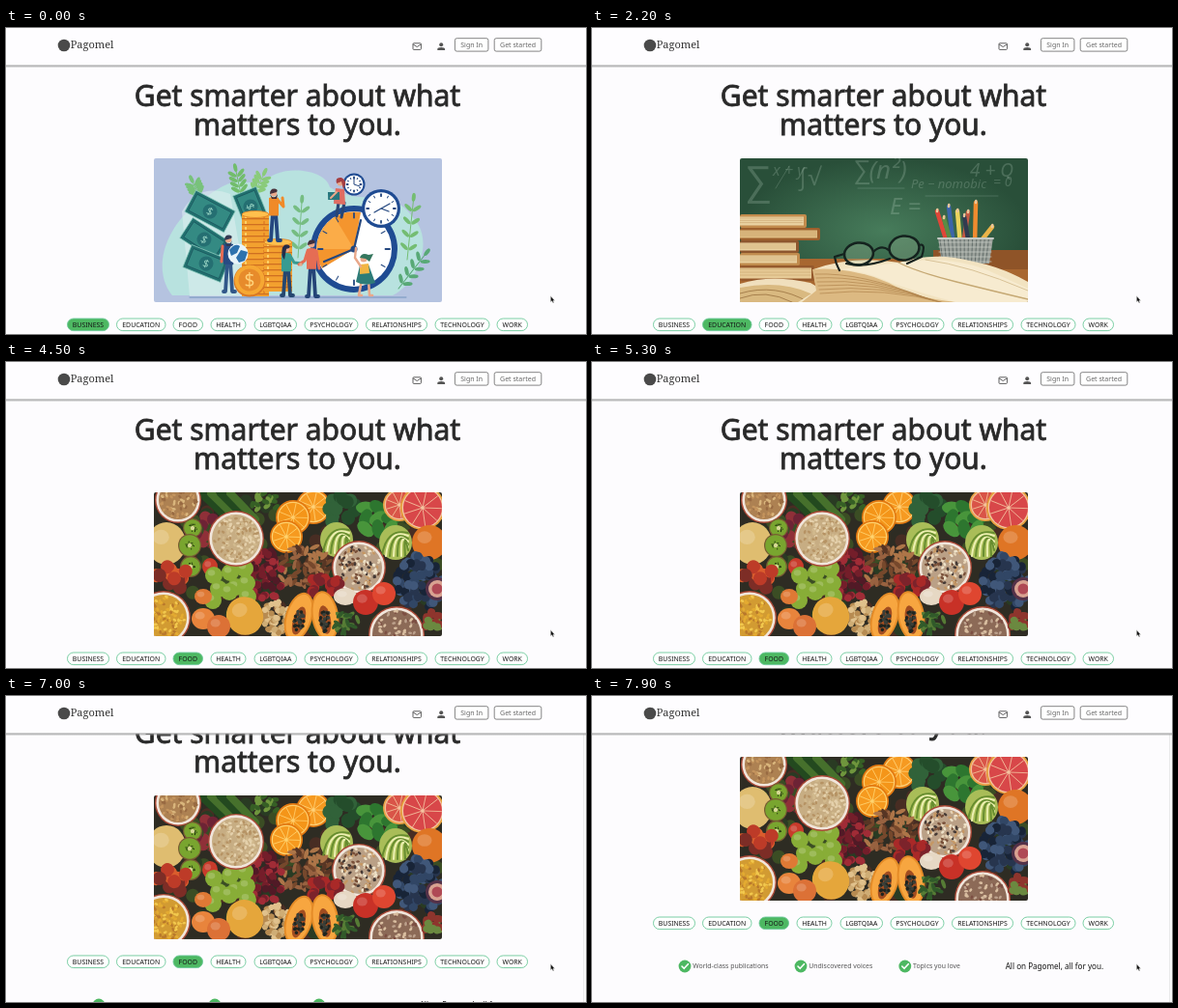
An HTML page for the animation above (8000 ms loop, 600 by 317 pixels).

```html
<!DOCTYPE html>
<html lang="en">
<head>
<meta charset="utf-8">
<title>Pagomel</title>
<style>
html, body { margin: 0; width: 100%; height: 100%; overflow: hidden; background: #fdfcfe; }
svg { display: block; width: 100vw; height: 100vh; }
text { font-family: "Noto Sans", "Open Sans", sans-serif; }
.serif { font-family: "Noto Serif", serif; }
</style>
</head>
<body>
<svg id="stage" viewBox="0 0 600 317" xmlns="http://www.w3.org/2000/svg"></svg>
<script>
const LOOP = 8000;
const SCROLL = [[6450, 0], [6600, 5], [6800, 18], [7000, 32], [7200, 45], [7400, 57], [7600, 67], [7800, 72]];
const TABS = [[0, 0], [300, 1], [4300, 2]];
const GREEN = '#4db862', NAVY = '#24477f', SKIN = '#e9a88a';

// Shape helpers
const rect = (x, y, w, h, fill, more = '') => `<rect x="${x}" y="${y}" width="${w}" height="${h}" fill="${fill}" ${more}/>`;
const circle = (x, y, r, fill, more = '') => `<circle cx="${x}" cy="${y}" r="${r}" fill="${fill}" ${more}/>`;
const oval = (x, y, rx, ry, fill, turn = 0, more = '') =>
  `<ellipse cx="${x}" cy="${y}" rx="${rx}" ry="${ry}" fill="${fill}" transform="rotate(${turn} ${x} ${y})" ${more}/>`;
const path = (d, fill, more = '') => `<path d="${d}" fill="${fill}" ${more}/>`;
const line = (d, color, w, more = '') => path(d, 'none', `stroke="${color}" stroke-width="${w}" stroke-linecap="round" stroke-linejoin="round" ${more}`);
const text = (x, y, size, fill, str, more = '') => `<text x="${x}" y="${y}" font-size="${size}" fill="${fill}" ${more}>${str}</text>`;
const group = (more, body) => `<g ${more}>${body}</g>`;
const repeat = (n, fn) => Array.from({ length: n }, (_, i) => fn(i)).join('');
const MIDDLE = 'text-anchor="middle"';

let seed = 7;
const random = () => (seed = seed * 16807 % 2147483647) / 2147483647;

// Small ovals scattered in an elliptical area
const scatter = (x, y, rx, ry, n, r, colors, flat = 1) => repeat(n, i => {
  const a = random() * 6.283, d = Math.sqrt(random());
  return oval((x + Math.cos(a) * d * rx).toFixed(1), (y + Math.sin(a) * d * ry).toFixed(1),
    r, r * flat, colors[i % colors.length], Math.round(random() * 180));
});

// ---- Business illustration
const sprig = (x, y, len, turn, color) => group(`transform="translate(${x} ${y}) rotate(${turn})"`,
  line(`M0 0V${-len}`, color, 1) + oval(0, -len - 3, 2, 4.5, color) +
  repeat(4, i => [-1, 1].map(s => oval(s * 4.5, -len * (i + 1) / 4.6, 2, 5, color, s * 50)).join('')));

const bill = (x, y, turn, w = 46, h = 25) => group(`transform="translate(${x} ${y}) rotate(${turn})"`,
  rect(-w / 2, -h / 2, w, h, '#22706f', 'stroke="#8fcfc0" stroke-width=".7"') +
  rect(-w / 2 + 3, -h / 2 + 3, w - 6, h - 6, '#348a83', 'stroke="#1b5960" stroke-width=".8"') +
  circle(0, 0, 7.5, '#256f72') + text(0, 4, 11, '#9ad6c5', '$', MIDDLE));

const stack = (x, y, w, h) => rect(x, y, w, h, '#f3a12f') + repeat(Math.floor(h / 6), i =>
  rect(x, y + 4 + i * 6, w, 1.3, '#cf6f21') + rect(x + 3, y + 1 + i * 6, 2, 3, '#ffd066') + rect(x + w - 6, y + 1 + i * 6, 2, 3, '#e38628')) +
  oval(x + w / 2, y, w / 2, 3.5, '#ffc04d', 0, 'stroke="#dc8128" stroke-width=".8"');

const clock = (x, y, r, ring, sector = '') => circle(x, y, r, '#1f4b92') + circle(x, y, r - ring, '#fff') + sector +
  repeat(12, i => line(`M${x} ${y - r + ring + 2}v${r * .1}`, NAVY, i % 3 ? 1 : 1.8, `transform="rotate(${i * 30} ${x} ${y})"`));

const person = (x, y, foot, hair, top, legs, arm) => {
  const hip = y + (foot - y) * .42;
  return line(`M${x - 1} ${hip}L${x - 3} ${foot}h-2M${x + 2} ${hip}L${x + 4} ${foot}h3`, legs, 3.8) +
    path(`M${x - 5} ${y + 5}Q${x} ${y + 3} ${x + 5} ${y + 5}L${x + 5} ${hip + 3}H${x - 5}Z`, top) +
    line(arm, top, 3) + circle(x, y, 3.4, SKIN) + path(`M${x - 4} ${y + 1}Q${x - 4} ${y - 5} ${x + 1} ${y - 4.5}Q${x + 5} ${y - 4} ${x + 3} ${y - 1}Z`, hair);
};

const business = () => rect(153, 135, 298, 149, '#b5c3e0') +
  path('M172 277C150 250 165 205 200 180S235 158 265 162C280 140 330 145 335 165C365 185 400 165 420 195C445 220 425 265 400 277Z', '#b8e2df') +
  path('M182 190Q200 160 232 172L250 278H190Z', '#dfeff0', 'opacity=".55"') +
  sprig(243, 172, 25, -12, '#72bd6c') + sprig(258, 170, 20, 25, '#8acb7a') + sprig(302, 238, 58, 4, '#76bd82') +
  sprig(415, 240, 62, 6, '#74bd72') + sprig(406, 270, 45, 38, '#58a976') + sprig(199, 172, 14, -25, '#78c27b') +
  bill(253, 185, 68, 34, 26) + bill(211, 190, 28) + bill(205, 219, 33, 44) + bill(207, 244, 22, 42) +
  line('M190 279H414', '#7393bd', 1) +
  stack(244, 193, 28, 85) + stack(267, 222, 29, 51) +
  circle(252, 262, 16.5, '#d97826') + circle(252, 261, 15.5, '#f6a833') + circle(252, 261, 11.5, '#e78b2b') + text(252, 268, 19, '#ffd27a', '$', MIDDLE) +
  clock(360, 229, 45, 6, path('M360 229L327 249A38.5 38.5 0 0 1 367 191Z', '#f4952e') + path('M360 229L322 229A38.5 38.5 0 0 1 340 196Z', '#fbac48')) +
  line('M329 242L360 229L367 199', NAVY, 2.2) + circle(360, 229, 3.5, NAVY) +
  clock(388, 187, 20, 3.2) + line('M381 191L388 187L396 190M388 187L397 182', NAVY, 1.3) +
  clock(360, 162, 11.5, 2) + line('M360 155V162L366 164', NAVY, 1) +
  person(277, 171, 220, '#473039', '#f08a28', NAVY, 'M281 178L287 185L286 176') + path('M273 172Q277 179 281 172L280 177H275Z', '#473039') +
  person(230, 219, 273, '#333953', '#274b83', '#315789', 'M227 227L224 240L234 244') +
  path('M226 220Q230 228 234 220L232 226H228Z', '#333953') + line('M224 226L223 242', '#e66b54', 3) +
  circle(240, 234, 10.5, '#e8f4fa') + path('M231 230Q237 222 242 226L239 233L233 236ZM243 230L250 232L247 241L241 243L238 238Z', '#2d72ae') +
  person(290, 229, 277, '#252d49', '#389b91', '#254770', 'M294 236L298 243L306 244') + path('M286 227Q284 236 288 240L290 229Z', '#252d49') +
  person(316, 224, 278, '#40303e', '#e56d54', '#244477', 'M312 231L309 241L303 245') + line('M321 231L324 249', '#e56d54', 3) + circle(305, 245, 1.8, SKIN) +
  line('M341 179L350 181L347 196M344 181L342 195', '#284675', 3.2) + path('M341 166L350 167L351 183L339 182Z', '#df6d62') +
  circle(346, 160, 3.6, SKIN) + path('M342 161Q340 154 347 155Q354 158 349 167L347 159Z', '#a53e42') +
  rect(327, 170, 12, 8, '#27767d', 'transform="skewX(2)"') + line('M342 170L336 176', SKIN, 2) +
  line('M368 261L365 277h3M375 261L376 277h3', SKIN, 2.6) + path('M366 246L375 245L382 264Q371 268 362 263Z', '#2e7c78') +
  path('M366 245L375 244L376 254L366 255Z', '#f2b544') + line('M367 247L361 238L362 228', SKIN, 2.4) +
  circle(370, 239, 3.5, SKIN) + path('M366 238Q368 232 375 235L380 234L376 242L372 239Z', '#34765d');

// ---- Education photograph, simplified
const book = (x, y, w, h, cover, page = '#ead2a1') => rect(x, y, w, h, cover, 'rx="2"') + rect(x, y + 2.5, w - 3, h - 5, page) +
  repeat(3, i => line(`M${x} ${y + 4 + i * (h - 7) / 3}h${w - 4}`, '#bd955e', .5));
const chalk = (x, y, size, str) => text(x, y, size, '#d8ebdd', str, 'opacity=".2" font-style="italic"');

const education = () => rect(153, 135, 298, 149, 'url(#board)') +
  chalk(157, 172, 40, '∑') + chalk(187, 153, 16, 'x + y') + chalk(213, 163, 25, '∫√') + chalk(270, 156, 26, '∑(n²)') +
  chalk(330, 166, 13, 'Pe − nomobic') + chalk(308, 193, 24, 'E =') + chalk(391, 154, 19, '4 + Q') + chalk(415, 164, 14, '= 0') +
  line('M204 143L190 166M275 166H323M345 174H420', '#d8ebdd', 1, 'opacity=".18"') +
  rect(153, 239, 298, 45, '#a86730') + rect(353, 230, 98, 20, '#8f5428') +
  book(153, 193, 69, 14, '#c28b4c') + book(153, 207, 83, 13, '#9e602d', '#dfbd83') + book(153, 220, 61, 13, '#8d562e') +
  book(153, 233, 62, 13, '#c08b4d') + book(153, 246, 77, 16, '#95592c', '#e7cb97') +
  [['#df4638', 357, 190, 368], ['#3c65aa', 369, 185, 374], ['#ead35d', 378, 190, 381], ['#c75943', 389, 191, 384], ['#f08b2f', 397, 181, 396], ['#eab348', 414, 206, 399], ['#5b8b45', 364, 197, 372], ['#303b50', 385, 195, 390]]
    .map(([c, x, y, foot]) => line(`M${x} ${y}L${foot} 225`, c, 4.5) + line(`M${x} ${y}l.3 -2`, '#eac69a', 2.5)).join('') +
  path('M358 217H415L411 244H362Z', '#9ba19b') + repeat(13, i => line(`M${360 + i * 4.2} 219L${363 + i * 3.7} 243`, '#5d6865', .9)) +
  repeat(5, i => line(`M359 ${222 + i * 5}H413`, '#cbd0c9', .7)) + line('M358 218H415', '#c4c9c3', 2) +
  path('M153 265Q185 255 226 264L260 284H153Z', '#f0dfbd') + path('M153 269Q195 261 226 275L239 284H153Z', '#d9b980') +
  line('M153 275Q190 264 224 284M153 280Q180 270 207 284', '#9a713f', .8) +
  path('M229 250Q270 235 318 243Q353 231 395 242Q425 248 451 263V284H213L232 272Z', '#f2e3c1') +
  path('M228 250Q269 247 307 264Q334 280 377 284H217L232 272Z', '#dcb982') +
  path('M318 243Q366 235 407 250Q432 261 451 270V284H376Q345 276 309 264Q287 253 257 250Z', '#f7ebd0') +
  repeat(6, i => line(`M${231 + i} ${255 + i * 4}Q${280 + i * 5} ${253 + i * 3} ${345 + i * 4} ${280 + i}`, '#ad8049', .65)) +
  line('M317 243Q337 253 377 263T451 281', '#c5a873', 1.3) + line('M345 240Q390 246 451 272', '#d8c297', 1) +
  oval(276, 234, 15, 11.5, '#a9c1a244', -7, 'stroke="#14221e" stroke-width="2.5"') + oval(323, 228, 15.5, 12.5, '#a9c1a244', -7, 'stroke="#14221e" stroke-width="2.5"') +
  line('M291 232Q299 224 307 230M261 234L251 237Q252 244 256 251M338 225Q346 222 341 237L326 244M263 244Q282 249 308 239', '#14221e', 2.2);

// ---- Food photograph, simplified
const bowl = (x, y, r, base, colors, n) => circle(x, y, r, '#a94836') + circle(x, y, r - 1.4, '#f1e6dc') +
  circle(x, y, r - 4, base) + scatter(x, y, r - 5, r - 5, n, 2, colors, .65);
const slice = (x, y, r, rind, flesh, pith) => circle(x, y, r, rind) + circle(x, y, r - 1.7, pith) + circle(x, y, r - 3, flesh) +
  repeat(9, i => line(`M${x} ${y}v${3.5 - r}`, pith, .8, `transform="rotate(${i * 40 + 12} ${x} ${y})"`)) + circle(x, y, 1.7, pith);
const kiwi = (x, y, r) => circle(x, y, r, '#775d32') + circle(x, y, r - 1.2, '#79a52f') + scatter(x, y, 4.5, 4.5, 18, .65, ['#20330f']) + circle(x, y, 2.2, '#d6d995');
const fruit = (x, y, rx, ry, c, turn = 0) => oval(x, y, rx, ry, c, turn) + oval(x - rx * .28, y - ry * .3, rx * .42, ry * .35, '#fff', turn, 'opacity=".18"');
const papaya = (x, y, turn) => oval(x, y, 14, 26, '#e48b27', turn) + oval(x, y, 12, 24, '#f7a640', turn) +
  oval(x, y + 4, 6, 15, '#a24d20', turn) + scatter(x, y + 4, 5, 13, 28, 1.8, ['#20251f', '#3b3f38']);

const food = () => rect(153, 135, 298, 149, '#2e2c23') + scatter(302, 210, 150, 75, 90, 7, ['#3b4d24', '#482d23', '#293b23']) +
  repeat(4, i => line(`M${202 + i * 10} 136L${231 + i * 9} 163`, i % 2 ? '#46702c' : '#23491f', 8)) +
  scatter(268, 145, 15, 9, 16, 4, ['#6f963d', '#365f25'], .6) +
  scatter(204, 177, 15, 20, 25, 6, ['#6d2335', '#8f3038', '#394d25']) +
  bowl(178, 143, 24, '#ad8152', ['#d9b57c', '#c4945d', '#986a42'], 75) +
  fruit(166, 188, 20, 22, '#dfbd70') + kiwi(193, 172, 10) + kiwi(190, 190, 12) + kiwi(191, 212, 11) +
  scatter(173, 222, 18, 13, 16, 7, ['#bd3b28', '#da5d2d', '#7d2d26']) + fruit(211, 212, 8, 9, '#c83b2b') +
  slice(318, 150, 18, '#e37b12', '#f69a21', '#ffd177') + slice(297, 161, 18, '#e27810', '#f49519', '#ffcd6b') + slice(290, 181, 17, '#e27810', '#f69a1f', '#ffd36e') +
  scatter(347, 153, 18, 15, 15, 7, ['#244d2b', '#316239']) +
  repeat(9, i => oval(372 + i % 3 * 13, 151 + Math.floor(i / 3) * 11, 10, 6.5, i % 2 ? '#2d762f' : '#48953b', i * 37)) +
  slice(407, 148, 17, '#e8a146', '#d95448', '#f3c198') + slice(431, 151, 23, '#e6a03d', '#d84749', '#f4c4a0') +
  fruit(438, 187, 18, 18, '#df7525') +
  [[342, 184], [403, 187]].map(([x, y]) => oval(x, y, 17, 18, '#a9bd58') + repeat(7, i => line(`M${x - 14 + i * 4} ${y + 14}Q${x - 10 + i * 3} ${y - 15} ${x + 13} ${y - 10 + i * 3}`, i % 2 ? '#edf0b1' : '#678d2f', 2))).join('') +
  scatter(308, 212, 27, 23, 65, 5.5, ['#76482c', '#986240', '#573524', '#ad7548'], .4) +
  scatter(267, 222, 20, 28, 75, 3.8, ['#741e2a', '#a02c36', '#511a26']) +
  [[215, 221], [232, 218], [220, 235], [238, 233], [214, 247], [231, 238], [249, 229], [247, 214], [250, 243]].map(([x, y]) => fruit(x, y, 9, 9, '#88ad37')).join('') +
  bowl(238, 183, 29, '#c7ad83', ['#e4d0ab', '#b69364', '#d1b98d'], 150) +
  scatter(428, 228, 24, 29, 90, 4.6, ['#27354e', '#405779', '#182437', '#314665']) +
  bowl(365, 213, 28, '#baa086', ['#e5d2b5', '#795039', '#c59764', '#453a36', '#eee2c9'], 115) +
  scatter(329, 232, 18, 10, 20, 5, ['#a92928', '#7c232b']) +
  scatter(280, 266, 16, 18, 75, 3, ['#cfad75', '#b78b51', '#e0c18c']) +
  fruit(247, 263, 19, 20, '#e5a63b', -22) + fruit(204, 266, 12, 11, '#e8843c') + fruit(220, 274, 12, 12, '#dc7136') + fruit(204, 243, 9, 8, '#df7935') +
  papaya(303, 264, 17) + papaya(330, 263, -9) +
  fruit(351, 243, 12, 9, '#e6d8c4') + fruit(372, 249, 13, 13, '#c83127') + fruit(391, 240, 12, 12, '#df4630') +
  scatter(352, 269, 12, 12, 20, 5, ['#567c35', '#315a2a'], .4) +
  bowl(163, 265, 28, '#d29b32', ['#f2c84d', '#e4ab31', '#b9782b'], 100) +
  bowl(404, 282, 29, '#8c6a57', ['#bca18c', '#7d4f43', '#d9bea0'], 90) +
  circle(446, 235, 12, '#543148') + circle(446, 235, 9, '#d8a291') + circle(446, 235, 5.5, '#af4955') +
  scatter(441, 272, 9, 14, 20, 4, ['#6b8940', '#8e352d']);

// ---- Page
const PILLS = [['BUSINESS', 63.5, 106.5], ['EDUCATION', 114.5, 165], ['FOOD', 173, 203.5], ['HEALTH', 212, 248], ['LGBTQIAA', 257, 300.5],
  ['PSYCHOLOGY', 309, 364], ['RELATIONSHIPS', 372.5, 435.5], ['TECHNOLOGY', 444, 500], ['WORK', 508, 539.5]];
const pill = ([label, x, end]) => rect(x, 301, end - x, 12.6, '#fff', 'class="pill" rx="6.3" stroke="#6dc99a" stroke-width=".9"') +
  text((x + end) / 2, 309.8, 6.9, '#151515', label, MIDDLE);
const perk = (x, label) => circle(x, 352, 6.4, GREEN) + line(`M${x - 3} 352l2.2 2.3l4.2 -4.6`, '#fff', 1.6) + text(x + 8.3, 354, 6.9, '#555', label);
const title = (y, str) => text(301.5, y, 30, '#292929', str, MIDDLE + ' stroke="#292929" stroke-width=".8"');
const button = (x, w, label) => rect(x, 10.7, w, 13.4, '#fff', 'rx="2" stroke="#666" stroke-width=".8"') + text(x + w / 2, 19.9, 7, '#666', label, MIDDLE);

const stage = document.getElementById('stage');
stage.innerHTML = `<defs>
  <clipPath id="frame"><rect x="153" y="135" width="298" height="149" rx="2"/></clipPath>
  <radialGradient id="board"><stop offset="0" stop-color="#477c5b"/><stop offset="1" stop-color="#294f39"/></radialGradient>
  <linearGradient id="shade" x2="0" y2="1"><stop offset="0" stop-color="#999"/><stop offset="1" stop-color="#999" stop-opacity="0"/></linearGradient>
  </defs>` +
  rect(0, 0, 600, 317, '#fdfcfe') +
  group('id="page"', title(81, 'Get smarter about what') + title(111, 'matters to you.') +
    group('clip-path="url(#frame)"', [business, education, food].map(draw => group('class="art"', draw())).join('')) +
    PILLS.map(pill).join('') + perk(96, 'World-class publications') + perk(216, 'Undiscovered voices') + perk(323.8, 'Topics you love') +
    text(427.7, 355, 8.1, '#151515', 'All on Pagomel, all for you.')) +
  group('id="bar"', rect(597, 0, 3, 317, '#fafafa') + line('M597.5 0V317', '#e6e6e8', .8)) +
  rect(0, 0, 600, 39, '#fefdff') + rect(0, 38.5, 600, 3, 'url(#shade)') +
  circle(60, 18, 6.3, '#4a4a4a') + text(66.7, 21.3, 11, '#333', 'Pagomel', 'class="serif"') +
  rect(421, 15.8, 8.4, 6.6, 'none', 'rx=".8" stroke="#5e5e5e"') + line('M421.3 17L425.2 19.5L429.1 17', '#5e5e5e', 1) +
  circle(450.2, 17.2, 2, '#555') + path('M446.3 23V21.7Q446.6 20 450.2 20T454.1 21.7V23Z', '#555') +
  button(464.4, 34.5, 'Sign In') + button(505.2, 48.6, 'Get started') +
  path('M563.3 277.6V284L564.8 282.8L565.8 285L567 284.5L566 282.4H567.8Z', '#111', 'stroke="#fff" stroke-width=".5"');

const page = document.getElementById('page'), bar = document.getElementById('bar');
const arts = [...document.querySelectorAll('.art')], pills = [...document.querySelectorAll('.pill')];

function scrollAt(t) {
  const next = SCROLL.findIndex(([at]) => at > t);
  if (next === 0) return 0;
  if (next < 0) return SCROLL[SCROLL.length - 1][1];
  const [t0, y0] = SCROLL[next - 1], [t1, y1] = SCROLL[next];
  return y0 + (y1 - y0) * (t - t0) / (t1 - t0);
}

function render(t) {
  const tab = TABS.filter(([at]) => at <= t).pop()[1], y = scrollAt(t);
  arts.forEach((art, i) => art.setAttribute('display', i === tab ? 'inline' : 'none'));
  pills.forEach((p, i) => p.setAttribute('fill', i === tab ? GREEN : '#fff'));
  page.setAttribute('transform', `translate(0 ${-y.toFixed(2)})`);
  bar.setAttribute('display', y > 0 ? 'inline' : 'none');
}

const start = performance.now();
function tick() {
  render((performance.now() - start) % LOOP);
  requestAnimationFrame(tick);
}
tick();
</script>
</body>
</html>
```
